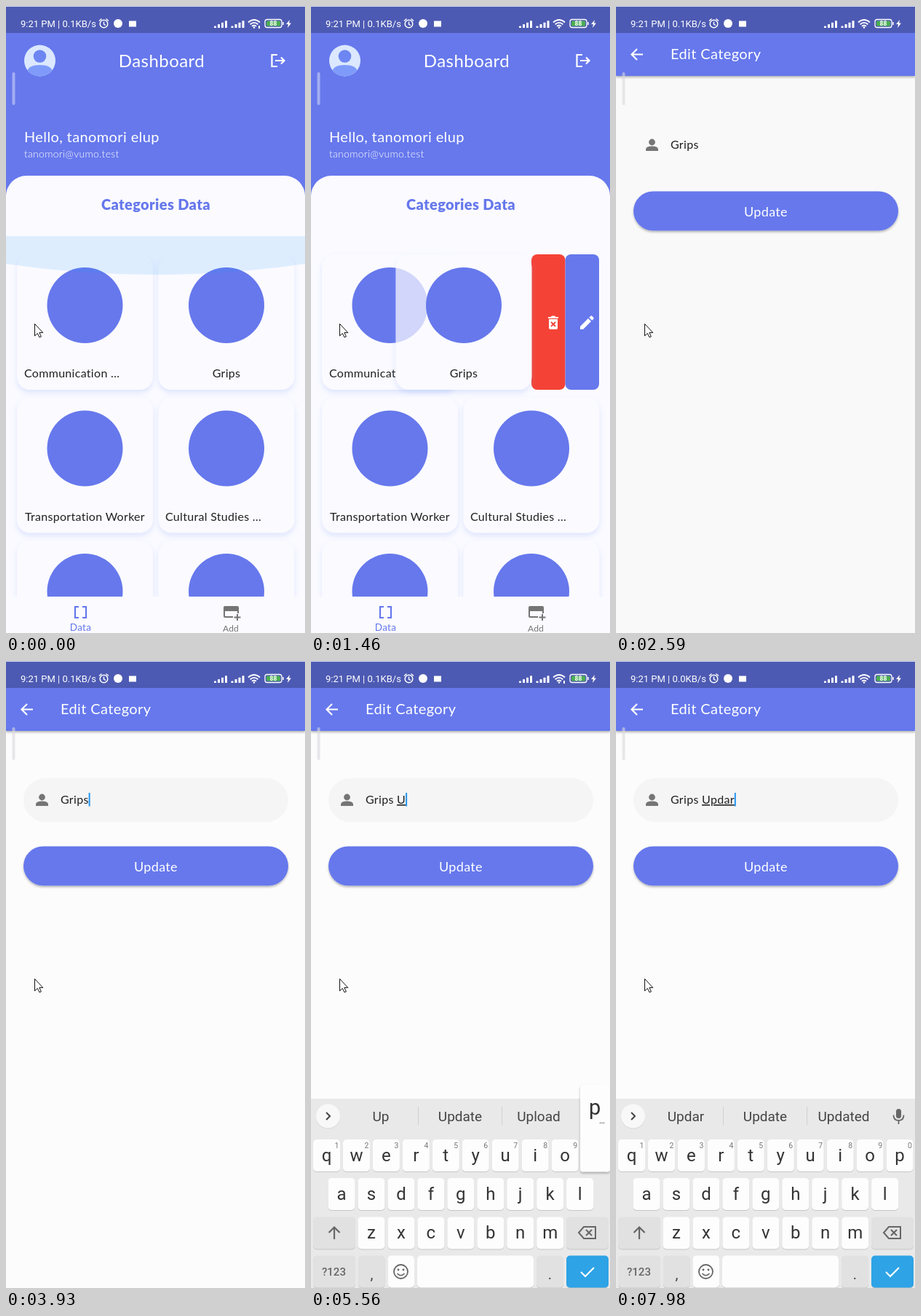
Write an HTML page that moves like this. It is 411 px wide and 861 px high and loops after 8 s.

```html
<!DOCTYPE html>
<html lang="en">
<head>
<meta charset="utf-8">
<title>Edit category</title>
<style>
  html, body { margin: 0; width: 100%; height: 100%; overflow: hidden; background: #fafaff; }
  svg { display: block; width: 411px; height: 861px; }
  text { font-family: Lato, sans-serif; letter-spacing: .019em; white-space: pre; }
  .kb, .kb text { font-family: Roboto, sans-serif; letter-spacing: 0; }
  .u { text-decoration: underline; text-decoration-skip-ink: none; text-decoration-thickness: 1px; text-underline-offset: 2px; }
</style>
</head>
<body>
<svg id="stage" viewBox="0 0 411 861" xmlns="http://www.w3.org/2000/svg"></svg>
<script>
const BLUE = '#6678ec', PAPER = '#fafaff', INK = '#212121';
const LOOP = 8000;

// Markup helpers
const rect = (x, y, w, h, fill, r = 0, more = '') =>
  `<rect x="${x}" y="${y}" width="${w}" height="${h}" rx="${r}" fill="${fill}" ${more}/>`;
const circle = (x, y, r, fill, more = '') => `<circle cx="${x}" cy="${y}" r="${r}" fill="${fill}" ${more}/>`;
const path = (d, fill, more = '') => `<path d="${d}" fill="${fill}" ${more}/>`;
const line = (d, color, w, more = '') => path(d, 'none', `stroke="${color}" stroke-width="${w}" ${more}`);
const label = (x, y, s, size, fill, more = '') =>
  `<text x="${x}" y="${y}" font-size="${size}" fill="${fill}" ${more}>${s}</text>`;
const MID = 'text-anchor="middle"';
const group = (id, body, more = '') => `<g id="${id}" ${more}>${body}</g>`;

function statusBar() {
  const bars = x => [0, 1, 2, 3].map(i =>
    rect(x + i * 5, 27.5 - i * 2.4, 3, 2.5 + i * 2.4, '#fff', .5)).join('');
  return rect(0, 0, 411, 37, '#4d5ab3') + rect(0, 0, 411, 1, '#d9dcf0') +
    `<g class="kb">${label(20, 28.5, '', 13, '#fff', 'id="clock"')}</g>` +
    circle(134.5, 24.5, 5.3, 'none', 'stroke="#fff" stroke-width="1.5"') +
    line('M134.5 21.5V25L137 26.5M128 20.5L131.5 17.5M141 20.5L137.5 17.5', '#fff', 1.4) +
    circle(154, 24, 6, '#fff') + rect(169, 20.5, 10, 8, '#fff', 0) +
    bars(286) + bars(309.5) +
    line('M333 22.5Q341 15.5 349 22.5M335.6 25.2Q341 20.5 346.4 25.2M338 27.8Q341 25.2 344 27.8', '#fff', 1.8) +
    circle(341, 29.5, 1.3, '#fff') + rect(347, 27, 2, 4, '#fff', 0, 'id="net"') +
    rect(356, 18.5, 23, 11, 'none', 3, 'stroke="#fff" stroke-width="1.3"') +
    rect(358, 20.5, 19, 7, '#4caf50', 1.5) + rect(380.2, 22, 1.5, 4, '#fff') +
    label(367.5, 27.2, '88', 8.5, '#fff', MID + ' class="kb" font-weight="700"') +
    path('M390 19L385 25H388L387 30L392 23.5H389Z', '#fff');
}

function card(x, y, name, left) {
  return rect(x, y, 187, 186, PAPER, 18, 'filter="url(#soft)"') +
    circle(x + 93.5, y + 70, 52, BLUE) +
    (left ? label(left, y + 169, name, 16, INK) : label(x + 93.5, y + 169, name, 16, INK, MID));
}

function dashboard() {
  const L = 15, R = 209.5, rows = [341, 537.5, 734];
  const trash = 'M326 427H329.5L331 425.5H335L336.5 427H340V429H326ZM327 430H339V442Q339 444 337 444H329Q327 444 327 442Z';
  return rect(0, 37, 411, 300, BLUE) +
    circle(46.5, 75, 21.5, '#dbe8ff') +
    `<g clip-path="url(#face)">${circle(46.5, 69, 8.8, '#6d86f2')}${path('M29 97V90Q31 81 46.5 81T64 90V97Z', '#7f9bfa')}</g>` +
    label(214, 83.5, 'Dashboard', 24, '#fff', MID) +
    line('M373 67H365.5V83H373M370 75H382M378 70.5L382.5 75L378 79.5', '#fff', 2.2) +
    rect(8.5, 91, 4, 45, '#fff', 2, 'opacity=".4"') +
    label(25, 186.5, 'Hello, tanomori elup', 20, '#fff') +
    label(25, 208, 'tanomori@vumo.test', 14, '#fff', 'font-weight="300"') +
    rect(0, 233, 411, 640, PAPER, 28) +
    label(206, 280, 'Categories Data', 20, BLUE, MID + ' font-weight="900"') +
    card(L, rows[0], 'Communication …', 25) +
    card(L, rows[1], 'Transportation Worker') +
    card(R, rows[1], 'Cultural Studies …', 219) +
    card(L, rows[2], '') + card(R, rows[2], '') +
    `<g clip-path="url(#pane)">` +
      group('red', rect(303, 341, 46.5, 186, '#f44336', 8) + path(trash, '#fff') +
        line('M330 434L336 440M336 434L330 440', '#f44336', 1.8)) +
      group('blue', rect(349.5, 341, 46.5, 186, BLUE, 8) +
        path('M370 440V444H374L385 433L381 429ZM382.3 427.7L384.3 425.7Q385.3 424.9 386.3 425.7L388.3 427.7Q389.1 428.7 388.3 429.7L386.3 431.7Z', '#fff') +
        `<g clip-path="url(#button)">${circle(373, 444.5, 30.5, '#c8c8c8', 'id="tap" fill-opacity=".35"')}</g>`) +
    '</g>' +
    group('grips', card(R, rows[0], 'Grips')) +
    circle(108.5, 411, 52, BLUE, 'opacity=".28" clip-path="url(#under)"') +
    path('M0 316H411V354Q205.5 384 0 354Z', '#2196f3', 'id="glow" fill-opacity=".13"') +
    rect(0, 811, 411, 50, PAPER) +
    line('M100 825H95V840H100M105 825H110V840H105', BLUE, 2.2) +
    label(102.5, 857.5, 'Data', 13.5, BLUE, MID) +
    path('M301 824H318Q320 824 320 826V834H318V831H301V838H312V840H301Q299 840 299 838V826Q299 824 301 824Z', '#757575') +
    rect(300, 827, 19, 3.5, '#757575') + line('M318 835V844M313.5 839.5H322.5', '#757575', 2) +
    label(309, 858.5, 'Add', 12, '#757575', MID);
}

function editPage() {
  return rect(0, 37, 411, 824, '#fcfcfc', 0, 'id="page"') +
    rect(0, 37, 411, 59, BLUE, 0, 'filter="url(#drop)"') +
    line('M37 66.5H22M29 59L21.5 66.5L29 74', '#fff', 2.2) +
    label(75, 73, 'Edit Category', 20, '#fff') +
    rect(8.5, 91, 4, 45, '#d9d9dd', 2, 'opacity=".6"') +
    rect(24, 161, 364, 60, '#f5f5f5', 30, 'id="field"') +
    circle(49.5, 187, 4.4, '#757575') + path('M41 199V196.5Q41.5 192.5 49.5 192.5T58 196.5V199Z', '#757575') +
    `<text id="entry" x="75" y="196" font-size="16" fill="${INK}"><tspan id="done"></tspan><tspan id="word"></tspan></text>` +
    rect(0, 181, 2, 18.5, '#2196f3', 0, 'id="caret"') +
    rect(24, 254.5, 364, 54, BLUE, 27, 'filter="url(#drop)"') +
    label(206, 288.5, 'Update', 18, '#fff', MID);
}

// Keyboard geometry: three letter rows on a 41px grid
const ROWS = [['qwertyuiop', 21.5, 657], ['asdfghjkl', 42, 710], ['zxcvbnm', 83, 763.5]];
const keyPos = {};
ROWS.forEach(([keys, x, y]) => [...keys].forEach((k, i) => keyPos[k] = [x + i * 40.95, y]));

function keyboard() {
  const key = (x, y, w, fill = '#fdfdfd') => rect(x, y + 1, w, 44, '#c6c6c6', 5) + rect(x, y, w, 44, fill, 5);
  const grey = '#e1e1e1', tone = '#666';
  const letters = Object.entries(keyPos).map(([k, [x, y]], i) =>
    key(x - 18.5, y, 37) + label(x, y + 29.5, k, 24, '#333', MID + ' class="letter"') +
    (i < 10 ? label(x + 14, y + 11.5, (i + 1) % 10, 10.5, '#777', MID) : '')).join('');
  return rect(0, 601, 411, 270, '#e9e9e9') +
    circle(23.5, 626, 16.5, '#d6d6d6') + circle(23.5, 625, 16.5, '#f8f8f8') +
    line('M21 620L26 625L21 630', '#444', 2) +
    line('M147.5 612V637M262.5 612V637', '#d0d0d0', 1) +
    [96, 205, 313].map(x => label(x, 632, '', 19, '#444', MID + ' class="hint"')).join('') +
    rect(385, 615, 7, 13, tone, 3.5) + line('M381.5 623.5Q381.5 631 388.5 631T395.5 623.5M388.5 631V636', tone, 1.8) +
    letters +
    key(3, 763.5, 58, grey) + path('M32 777V794M24.5 785L32 777.5L39.5 785', 'none', `id="shift" stroke="${tone}" stroke-width="2.2"`) +
    key(351, 763.5, 58, grey) +
    line('M375 777H391V793H375L368 785Z', tone, 2) + line('M378 781L386 789M386 781L378 789', tone, 2) +
    key(3, 816.5, 58, grey) + label(31.5, 844, '?123', 15, tone, MID + ' font-weight="500"') +
    key(65, 816.5, 36.5, grey) + label(83.5, 849, ',', 20, '#444', MID) +
    key(105.5, 816.5, 36.5) + circle(123.5, 838.5, 9.5, 'none', `stroke="${tone}" stroke-width="1.8"`) +
    circle(120, 836, 1.4, tone) + circle(127, 836, 1.4, tone) + line('M118.5 841Q123.5 846.5 128.5 841', tone, 1.6) +
    key(146, 816.5, 160) +
    key(310, 816.5, 37, grey) + label(328.5, 849, '.', 20, '#444', MID) +
    key(351, 816.5, 58, '#2ea3e6') + line('M371 839L377 845L389 833', '#fff', 2.2) +
    group('popup', rect(-20, -75, 41, 119.5, '#fdfdfd', 4, 'filter="url(#drop)"') +
      label(0, -34, '', 29, '#333', MID + ' id="popKey"') + label(10, -22, '…', 12, '#333', MID));
}

const clip = (id, body) => `<clipPath id="${id}">${body}</clipPath>`;
const stage = document.getElementById('stage');
stage.innerHTML = '<defs>' +
  clip('face', circle(46.5, 75, 21.5)) +
  clip('pane', rect(209, 341, 187, 186)) +
  clip('button', rect(349.5, 341, 46.5, 186, '#000', 8)) +
  clip('under', rect(209.5, 341, 187, 186, '#000', 18, 'id="underBox"')) +
  '<filter id="soft" x="-10%" y="-10%" width="120%" height="120%"><feDropShadow dx="0" dy="4" stdDeviation="3.5" flood-color="#7a9cf5" flood-opacity=".22"/></filter>' +
  '<filter id="drop" x="-20%" y="-20%" width="140%" height="150%"><feDropShadow dx="0" dy="2" stdDeviation="1.8" flood-opacity=".28"/></filter>' +
  '</defs>' + group('home', dashboard()) + group('edit', editPage()) +
  group('keys', keyboard(), 'class="kb"') + statusBar() +
  path('M39.5 436.5V453L43.3 449.5L46 455L48.4 454L45.8 448.6H50.8Z', '#fff', 'stroke="#111" stroke-width="1"');

const $ = id => document.getElementById(id);
const show = (id, on) => $(id).style.display = on ? '' : 'none';
const at = (table, t) => table.filter(row => row[0] <= t).pop();

// Held poses: [ms, value]
const slide = [[0, 0], [860, 27], [1010, 58], [1160, 92], [1310, 93]];
const rise = [[0, 260], [4080, 150], [4210, 14], [4360, 0]];
// [ms, finished text, word being composed, caret, hints, popup key]
const typing = [
  [0, 'Grips', '', 0, ''],
  [3930, 'Grips', '', 1, ''],
  [4210, '', 'Grips', 1, "Grips|Grip's|Gripes"],
  [4630, '', 'Grips', 0, "Grips|Grip's|Gripes"],
  [5030, 'Grips ', '', 1, 'and|are|with'],
  [5290, 'Grips ', '', 1, 'And|Are|With'],
  [5410, 'Grips ', 'U', 1, 'U|Up|You'],
  [5560, 'Grips ', 'U', 1, 'Up|Update|Upload', 'p'],
  [5680, 'Grips ', 'Up', 1, 'Up|Update|Upload'],
  [5810, 'Grips ', 'Up', 1, 'Upd|Update|Updated', 'd'],
  [5940, 'Grips ', 'Upd', 1, 'Upda|Update|Updated'],
  [6060, 'Grips ', 'Upda', 1, 'Upday|Update|Updated', 'y'],
  [6210, 'Grips ', 'Upday', 1, 'Updaye|*Update|Updated'],
  [6340, 'Grips ', 'Updaye', 1, 'Updaye|*Update|Updated'],
  [6470, 'Grips ', 'Updaye', 1, 'Updaye|*Update|Updates'],
  [6880, 'Grips ', 'Upday', 1, 'Upday|*Update|Updated'],
  [7000, 'Grips ', 'Upda', 1, 'Upda|Update|Updated'],
  [7120, 'Grips ', 'Upd', 1, 'Upd|Updated|Updated'],
  [7260, 'Grips ', 'Upda', 1, 'Upda|Update|Updated'],
  [7830, 'Grips ', 'Upda', 0, 'Updar|Update|Updated'],
  [7980, 'Grips ', 'Updar', 1, 'Updar|Update|Updated']
];
const hints = [...document.querySelectorAll('.hint')];
const letters = [...document.querySelectorAll('.letter')];

function drawHome(t) {
  const d = at(slide, t)[1];
  show('glow', t < 150);
  show('red', d > 0);
  show('blue', d > 0);
  show('tap', t >= 2440);
  $('red').setAttribute('transform', `translate(${93 - d} 0)`);
  $('blue').setAttribute('transform', `translate(${(93 - d) / 2} 0)`);
  $('grips').setAttribute('transform', `translate(${-d} 0)`);
  $('underBox').setAttribute('x', 209.5 - d);
}

function drawEdit(t) {
  const [, done, word, caret, words, pop] = at(typing, t);
  show('field', t >= 2710);
  $('page').setAttribute('fill', t < 2710 ? '#f9f9f9' : '#fcfcfc');
  $('done').textContent = done;
  $('word').textContent = word;
  $('word').setAttribute('class', 'u');
  show('caret', caret);
  $('caret').setAttribute('x', 75 + $('entry').getComputedTextLength());

  show('keys', t >= 4080);
  $('keys').setAttribute('transform', `translate(0 ${at(rise, t)[1]})`);
  const list = words.split('|');
  hints.forEach((el, i) => {
    const s = list[i] || '';
    el.textContent = s.replace('*', '');
    el.setAttribute('font-weight', s[0] === '*' ? 700 : 400);
  });
  const caps = t >= 5290 && t < 5410;
  letters.forEach((el, i) => {
    const k = Object.keys(keyPos)[i];
    el.textContent = caps ? k.toUpperCase() : k;
  });
  $('shift').setAttribute('stroke', caps ? '#2ea3e6' : '#666');
  show('popup', pop);
  if (pop) {
    const [x, y] = keyPos[pop];
    $('popup').setAttribute('transform', `translate(${x} ${y})`);
    $('popKey').textContent = pop;
  }
}

function draw(t) {
  const editing = t >= 2590;
  show('home', !editing);
  show('edit', editing);
  show('keys', false);
  if (editing) drawEdit(t); else drawHome(t);
  $('clock').textContent = `9:21 PM | 0.${t < 7690 ? 1 : 0}KB/s`;
  show('net', t < 1460 || (t >= 4360 && t < 7410));
}

const start = performance.now();
function tick() {
  draw((performance.now() - start) % LOOP);
  requestAnimationFrame(tick);
}
tick();
</script>
</body>
</html>
```
